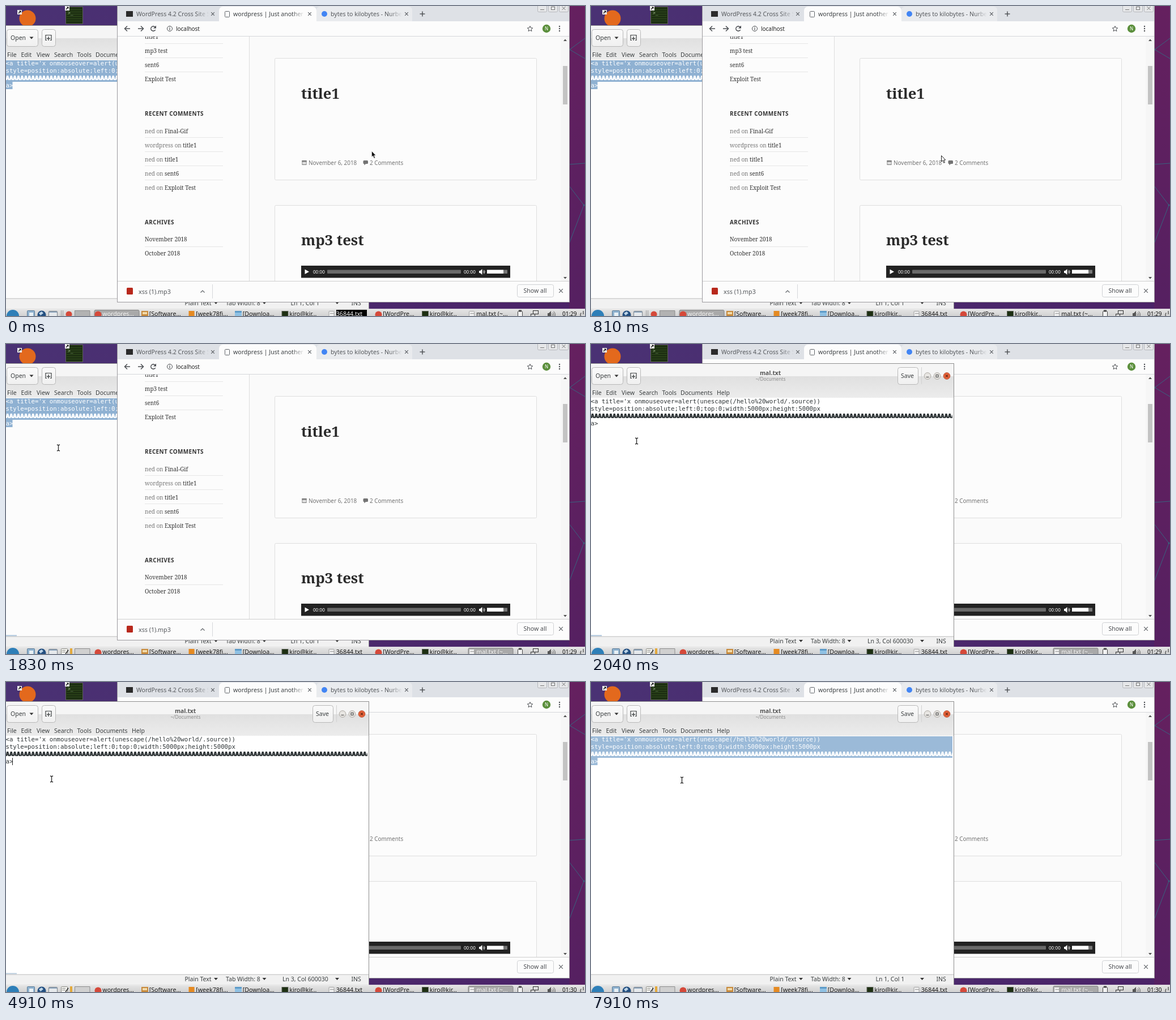
An HTML page with a canvas that plays this animation: 1022 by 548 pixels, repeating every 8 s.

```html
<!DOCTYPE html>
<html lang="en">
<head>
<meta charset="utf-8">
<title>Editor and browser</title>
<style>
html, body { margin: 0; width: 100%; height: 100%; overflow: hidden; }
canvas { display: block; }
</style>
</head>
<body>
<canvas id="stage" width="1022" height="548"></canvas>
<script>
const c = document.getElementById('stage').getContext('2d');
const LOOP = 8000, RAISE = 2040, SELECT = 6860;
const SANS = '"Noto Sans", sans-serif', SERIF = '"Noto Serif", serif';
const MONO = '"DejaVu Sans Mono", monospace', ARIAL = '"Liberation Sans", sans-serif';

// start time, x, y, shape
const POINTER = [
  [0, 645, 256, 'dark'], [150, 643, 256, 'light'], [370, 646, 255, 'light'],
  [660, 646, 263, 'light'], [810, 618, 264, 'light'], [950, 120, 184, 'beam'],
  [1100, 120, 185, 'beam'], [1240, 100, 189, 'beam'], [1390, 100, 188, 'beam'],
  [1830, 92, 183, 'beam'], [RAISE, 80, 171, 'beam'], [7910, 160, 173, 'beam']
];
// moments at which the caret turns on and off
const CARET = [[2490, 3260], [3710, 4460], [4910, SELECT]];

function rect(x, y, w, h, fill) {
  c.fillStyle = fill;
  c.fillRect(x, y, w, h);
}
function round(x, y, w, h, r, fill, line) {
  c.beginPath();
  c.roundRect(x, y, w, h, r);
  if (fill) { c.fillStyle = fill; c.fill(); }
  if (line) { c.strokeStyle = line; c.lineWidth = 1; c.stroke(); }
}
function disc(x, y, r, fill, line) {
  c.beginPath();
  c.arc(x, y, r, 0, 7);
  if (fill) { c.fillStyle = fill; c.fill(); }
  if (line) { c.strokeStyle = line; c.stroke(); }
}
function line(color, width, ...p) {
  c.beginPath();
  for (let i = 0; i < p.length; i += 2) c.lineTo(p[i], p[i + 1]);
  c.strokeStyle = color;
  c.lineWidth = width;
  c.stroke();
}
function poly(fill, ...p) {
  c.beginPath();
  for (let i = 0; i < p.length; i += 2) c.lineTo(p[i], p[i + 1]);
  c.closePath();
  c.fillStyle = fill;
  c.fill();
}
function text(s, x, y, size, color, family = SANS, weight = 400) {
  c.font = `${weight} ${size}px ${family}`;
  c.fillStyle = color;
  c.fillText(s, x, y);
  return c.measureText(s).width;
}
function shade(x0, y0, x1, y1, from, to) {
  const g = c.createLinearGradient(x0, y0, x1, y1);
  g.addColorStop(0, from);
  g.addColorStop(1, to);
  return g;
}
function cross(x, y, r, color, width = 1.2) {
  line(color, width, x - r, y - r, x + r, y + r);
  line(color, width, x + r, y - r, x - r, y + r);
}
function down(x, y, color = '#333') {
  poly(color, x - 3.5, y - 2, x + 3.5, y - 2, x, y + 2);
}
function terminal(x, y, size) {
  rect(x, y, size, size, '#5d6359');
  rect(x + 1, y + 1, size - 2, size - 2, '#1d2f12');
}

function desktop() {
  rect(0, 0, 1022, 548, shade(0, 0, 1022, 0, '#4a3274', '#4b2267'));
  rect(994, 0, 28, 548, shade(0, 0, 0, 548, '#65205f', '#552061'));
  const teal = '#37647f';
  line(teal, 1, 1022, 57, 995, 77, 1022, 93);
  line(teal, 1, 994, 280, 1022, 278);
  line(teal, 1, 994, 318, 1020, 352, 994, 420);
  disc(1020, 352, 1.5, teal);
  disc(995, 77, 1.5, teal);
  disc(38, 22, 14.5, '#e3691d');
  terminal(105, 1, 31);
  for (let y = 6; y < 30; y += 4) line('#2f4a1c', 1, 107, y + .5, 134, y + .5);
  text('>_', 109, 15, 8, '#9fb88e', MONO);
  for (const [x, y] of [[20, 7], [104, 0]]) {
    rect(x, y, 8, 8, '#eee');
    line('#111', 1.3, x + 2, y + 6, x + 6, y + 2);
    poly('#111', x + 3, y + 1.5, x + 6.5, y + 1.5, x + 6.5, y + 5);
  }
}

function tab(title, x, end, color) {
  c.save();
  c.beginPath();
  c.rect(x, 0, end - x, 26);
  c.clip();
  text(title, x, 18, 10.55, shade(end - 22, 0, end, 0, color, color + '00'));
  c.restore();
}

function browserFrame() {
  rect(196, 0, 799, 524, '#9c9a9e');
  rect(197, 0, 797, 523, '#fcfcfc');
  rect(197, 0, 797, 27, '#dee1e6');
  round(548, 1, 169, 26, [6, 6, 0, 0], '#e9ebee');
  round(376, 1, 172, 30, [7, 7, 0, 0], '#fcfcfc');
  rect(212, 9, 12, 10, '#2b2b2b');
  tab('WordPress 4.2 Cross Site Scripting', 230, 358, '#55585c');
  tab('wordpress | Just another WordPress site', 401, 527, '#3c4043');
  tab('bytes to kilobytes - Nurbex Search', 573, 699, '#55585c');
  c.lineWidth = 1;
  round(386.5, 9.5, 8, 10, 1, '#fff', '#5f6368');
  disc(562, 14, 5, '#4285f4');
  for (const x of [365, 536, 707]) cross(x, 14, 2.8, '#5f6368');
  line('#4a4d51', 1.4, 730.5, 14, 739.5, 14);
  line('#4a4d51', 1.4, 735, 9.5, 735, 18.5);

  for (const x of [938.5, 957.5, 976.5]) round(x, -4.5, 16, 15, 2, '#e6e7e9', '#b4b6ba');
  line('#777', 1, 943, 6.5, 950, 6.5);
  c.strokeRect(962.5, 1.5, 6, 5);
  cross(984.5, 4, 3, '#777', 1);

  const ink = '#4a4d51';
  line(ink, 1.5, 214, 35.5, 209.5, 40, 214, 44.5);
  line(ink, 1.5, 210, 40, 219, 40);
  line(ink, 1.5, 238, 35.5, 242.5, 40, 238, 44.5);
  line(ink, 1.5, 233, 40, 242, 40);
  c.beginPath();
  c.arc(260, 40, 4.2, .5, 5.5);
  c.stroke();
  poly(ink, 265, 34.5, 265, 39.5, 260, 39.5);
  c.lineWidth = 1;
  disc(289, 40, 4.5, null, ink);
  line(ink, 1.2, 289, 39, 289, 42.7);
  rect(288.4, 37, 1.2, 1.2, ink);
  text('localhost', 300, 44, 9.93, '#222');
  const star = [];
  for (let i = 0; i < 11; i++) {
    const a = i * Math.PI / 5 - Math.PI / 2, r = i % 2 ? 2.3 : 5;
    star.push(925 + r * Math.cos(a), 40.5 + r * Math.sin(a));
  }
  line(ink, 1, ...star);
  disc(954, 40, 7.2, '#5b8f3c');
  text('N', 950.9, 43, 8, '#fff');
  for (const y of [36, 40, 44]) disc(977, y, 1.2, ink);
  rect(197, 53, 797, 1, '#d5d7da');
}

function sidebar() {
  const rule = y => rect(245, y, 138, 1, '#e6e6e6');
  const link = (s, x, y) => text(s, x, y, 9.93, '#333', SERIF);
  const heading = (s, y) => {
    c.letterSpacing = '0.4px';
    text(s, 245, y, 9.93, '#333', SANS, 700);
    c.letterSpacing = '0px';
  };
  ['title1', 'mp3 test', 'sent6', 'Exploit Test'].forEach((s, i) => {
    link(s, 245, 58 + i * 25);
    if (i < 3) rule(66 + i * 25);
  });
  heading('RECENT COMMENTS', 194);
  [['ned', 'Final-Gif'], ['wordpress', 'title1'], ['ned', 'title1'],
   ['ned', 'sent6'], ['ned', 'Exploit Test']].forEach(([who, post], i) => {
    const w = text(who + ' on ', 245, 224.5 + i * 25.1, 9.93, '#777', SERIF);
    link(post, 245 + w, 224.5 + i * 25.1);
    if (i < 4) rule(232 + i * 25);
  });
  heading('ARCHIVES', 386);
  link('November 2018', 245, 416);
  rule(425);
  link('October 2018', 245, 441);
}

function posts() {
  rect(429, 54, 1, 433, '#dedede');
  rect(430, 54, 549, 433, '#fafafa');
  round(474.5, 92.5, 462, 215, 2, '#fcfcfc', '#dedede');
  round(474.5, 352.5, 462, 150, 2, '#fcfcfc', '#dedede');
  text('title1', 521, 164, 25.65, '#2a2a2a', SERIF, 700);
  text('mp3 test', 521, 423, 25.65, '#2a2a2a', SERIF, 700);
  c.strokeStyle = '#777';
  c.strokeRect(523, 273.5, 7, 7);
  rect(522.5, 273, 8, 2.5, '#777');
  for (const x of [525.3, 527.7]) line('#999', .7, x, 275, x, 280);
  text('November 6, 2018', 534, 280.5, 9.93, '#737373');
  round(630.5, 273, 8.5, 6, 1.5, '#737373');
  poly('#737373', 632, 278, 636, 278, 632.5, 281.5);
  text('2 Comments', 642, 280.5, 9.93, '#737373');

  rect(521, 459, 369, 21.5, '#222');
  poly('#fff', 527.5, 465.5, 535, 469.8, 527.5, 474);
  text('00:00', 542, 473, 8.3, '#fff', ARIAL);
  round(567, 466.5, 236, 6.5, 1, '#6a6a6a');
  text('00:00', 808, 473, 8.3, '#fff', ARIAL);
  poly('#fff', 835, 468, 837, 468, 840.5, 465, 840.5, 475, 837, 472, 835, 472);
  for (const r of [2, 4]) {
    c.beginPath();
    c.arc(841, 470, r, -1, 1);
    c.strokeStyle = '#fff';
    c.lineWidth = 1;
    c.stroke();
  }
  rect(849, 466.5, 36, 6.5, '#777');
  rect(849, 466.5, 29, 6.5, '#fff');
}

function browser() {
  c.save();
  c.beginPath();
  c.rect(197, 54, 797, 433);
  c.clip();
  rect(197, 54, 797, 433, '#fcfcfc');
  sidebar();
  posts();
  rect(979, 54, 15, 433, '#f6f6f6');
  rect(983, 106, 8, 68, '#c3c3c3');
  poly('#505050', 984, 62, 990, 62, 987, 58.5);
  poly('#505050', 984, 479, 990, 479, 987, 482.5);
  c.restore();

  rect(197, 486, 797, 1, '#cfcfcf');
  round(213, 498, 11, 12, 1.5, '#b8281c');
  text('xss (1).mp3', 234, 508.5, 10.7, '#55585c');
  line('#5f6368', 1.2, 343.5, 506.5, 347, 503, 350.5, 506.5);
  rect(364, 492, 1, 25, '#d5d7da');
  round(902.5, 492.5, 64, 22, 3, '#fcfcfc', '#cfd1d4');
  text('Show all', 913.5, 507, 10.55, '#4a4d51');
  cross(979.5, 503.5, 3.3, '#5f6368');
}

function button(x, w) {
  round(x + .5, 41.5, w, 30, 4, shade(0, 41, 0, 71, '#fafafa', '#f0f0f0'), '#b9b9b9');
}

function editor(t) {
  const raised = t >= RAISE, selected = !raised || t >= SELECT;
  const ink = '#3b3f40', ui = (s, x, y) => text(s, x, y, 10.5, ink);
  rect(0, 34, 641, 502, '#8f8f8f');
  rect(0, 35, 640, 22, '#f5f5f5');
  rect(0, 57, 640, 38, shade(0, 57, 0, 95, '#e0e0e0', '#ececec'));
  rect(0, 95, 640, 422, raised ? '#fff' : '#fcfcfc');
  button(1, 55);
  button(63, 24);
  button(541, 36);
  ui('Open', 8, 60);
  down(45, 56.5);
  line(ink, 1.2, 72, 60.5, 70, 60.5, 70, 51.5, 80, 51.5, 80, 60.5, 78, 60.5);
  line(ink, 1.3, 75, 54, 75, 61);
  line(ink, 1.3, 71.8, 57.5, 78.2, 57.5);
  ui('Save', 547, 60);
  text('mal.txt', 298, 55, 10.3, '#555', SANS, 700);
  text('~/Documents', 290.5, 65, 8.4, '#8c8c8c');
  rect(583, 41, 1, 30, '#d2d2d2');
  c.lineWidth = 1;
  disc(594, 56.5, 5.8, '#e7e5e2', '#aaa6a0');
  disc(611, 56.5, 5.8, '#e7e5e2', '#aaa6a0');
  disc(628, 56.5, 5.8, '#e8633a', '#b5482a');
  line('#555', 1.2, 591.5, 58.5, 596.5, 58.5);
  c.strokeRect(609, 54.5, 4, 4);
  cross(628, 56.5, 2.2, '#5a2415');
  [['File', 2], ['Edit', 26.5], ['View', 54], ['Search', 85], ['Tools', 125.5],
   ['Documents', 158], ['Help', 222]].forEach(([s, x]) => ui(s, x, 90));

  if (selected) {
    const blue = raised ? '#9bbad8' : '#8fb1d2';
    rect(0, 96, 638, 38, blue);
    rect(0, 134, 11.5, 13, blue);
  }
  const code = (s, y, x = -.5, weight = 400) =>
    text(s, x, y, 10.7, selected ? '#fff' : '#2e3436', MONO, weight);
  code("<a title='x onmouseover=alert(unescape(/hello%20world/.source))", 105);
  code('style=position:absolute;left:0;top:0;width:5000px;height:5000px', 118);
  c.save();
  c.beginPath();
  c.rect(0, 120, 638, 14);
  c.clip();
  for (const shift of [-1, 0]) code('A'.repeat(101), 131, shift, 700);
  c.restore();
  code('a>', 144);
  if (CARET.some(([on, off]) => t >= on && t < off)) rect(11, 134, 1, 13, '#222');
  if (t >= 950 && t < SELECT) rect(0, 514.5, 19, 2, t < 3560 ? '#a9c3dc' : '#b7cbdd');

  rect(0, 516.5, 640, 1, '#cdcdcd');
  rect(0, 517.5, 640, 18, '#f1f1f1');
  ui('Plain Text', 315.5, 529);
  down(370.5, 525);
  ui('Tab Width: 8', 388, 529);
  down(456, 525);
  ui(selected ? 'Ln 1, Col 1' : 'Ln 3, Col 600030', selected ? 502.5 : 488, 529);
  down(584.5, 525);
  ui('INS', 609.5, 529);
}

function taskbar(t) {
  const editing = t >= 1530, labelled = t < 370;
  rect(0, 535.5, 1022, 13, shade(0, 536, 0, 548, '#e4e4e4', '#d2d2d2'));
  rect(0, 535.5, 1022, 1, '#f4f4f4');
  disc(12, 548, 11, '#2e7fb8');
  round(37.5, 538.5, 13, 12, 1, '#8fb2cf', '#5b7b96');
  rect(41, 542, 7, 6, '#e8f0f5');
  disc(63, 546, 7.5, '#234f80');
  poly('#bcd3e6', 58, 543, 63, 540, 66, 543, 61, 547);
  round(75.5, 539.5, 15, 12, 1, '#e6e9ec', '#7c848c');
  rect(76, 540, 14, 2, '#8fa6bd');
  if (editing) {
    round(97.5, 538.5, 11, 12, 1, '#f5f5f0', '#8b8b85');
    for (const y of [541.5, 544.5]) line('#888', 1, 99, y, 105, y);
    line('#333', 1.6, 110, 541, 105, 548);
    rect(113, 538, 4, 10, '#e3a93b');
  } else {
    for (const x of [97.5, 100.5]) line('#999', 1, x, 538, x, 548);
    disc(111, 545, 5.5, '#d5493a');
  }
  rect(121, 538, 27, 10, editing ? '#d0d0d0' : '#b2b2b2');
  line('#8d8d8d', 1, 121.5, 548, 121.5, 538.5, 148, 538.5, 148, 548);

  const names = ['wordpres...', '[Software...', '[week78fi...', '[Downloa...', 'kiro@kir...',
    '36844.txt', '[WordPre...', 'kiro@kir...', 'mal.txt (~...'];
  const kinds = 'BFVDTNBTN';
  names.forEach((s, i) => {
    const x = 162.5 + i * 82.5, pressed = i === (editing ? 8 : 0);
    if (pressed) round(x - 6.5, 537.5, 79, 14, 2, '#a9a9a9', '#858585');
    const kind = kinds[i];
    if (kind === 'B') disc(x, 545.5, 6, '#d5493a');
    if (kind === 'F') { rect(x - 6, 539, 12, 10, '#c78a3c'); rect(x - 4, 541, 8, 4, '#f1d9a8'); }
    if (kind === 'V') rect(x - 5, 539, 10, 10, '#e58a22');
    if (kind === 'D') { rect(x - 6, 539, 12, 10, '#5c9bc9'); rect(x - 6, 542, 12, 6, '#8fc1e4'); }
    if (kind === 'T') terminal(x - 6, 539, 12);
    if (kind === 'N') {
      round(x - 5, 539.5, 9, 12, 1, '#ededed', '#a5a5a5');
      line('#999', 1, x - 3, 543.5, x + 4, 543.5);
    }
    const label = labelled && i === 5;
    if (label) rect(583, 537, 54, 11, '#000');
    text(s, x + 7.8, 548, 10.6, label || pressed ? '#f5f5f5' : '#1c1c1c');
  });

  round(903.5, 539.5, 8, 11, 1, '#f2f2f2', '#444');
  rect(905, 537.5, 5, 3, '#444');
  c.strokeStyle = '#333';
  c.strokeRect(930.5, 538.5, 9, 6);
  c.strokeRect(926.5, 544.5, 7, 5);
  poly('#555', 956, 543, 958, 543, 962, 539, 962, 549, 956, 549);
  for (const r of [3, 5.5, 8]) {
    c.beginPath();
    c.arc(961.5, 546, r, -.9, .9);
    c.strokeStyle = '#666';
    c.stroke();
  }
  text(t < 3860 ? '01:29' : '01:30', 982, 548, 10, '#111');
  c.lineWidth = 1.4;
  c.beginPath();
  c.arc(1019, 546, 5, -.8, 3.9);
  c.strokeStyle = '#555';
  c.stroke();
  line('#555', 1.4, 1019, 539, 1019, 545);
}

function pointer(t) {
  const [, x, y, shape] = POINTER.filter(k => k[0] <= t).pop();
  c.save();
  c.translate(x + .5, y + .5);
  if (shape === 'beam') {
    for (const [color, w] of [['#fff', 3], ['#333', 1.4]]) {
      line(color, w, -2.5, -5.5, 0, -4.5, 2.5, -5.5);
      line(color, w, -2.5, 5.5, 0, 4.5, 2.5, 5.5);
      line(color, w, 0, -4.5, 0, 4.5);
    }
  } else {
    const dark = shape === 'dark';
    const arrow = [0, 0, 0, 10.5, 2.3, 8.3, 4.2, 12.8, 6, 12, 4.2, 7.8, 7.2, 7.6];
    poly(dark ? '#111' : '#fff', ...arrow);
    line(dark ? '#fff' : '#222', dark ? .6 : 1, ...arrow, 0, 0);
  }
  c.restore();
}

function draw(now) {
  const t = now % LOOP;
  desktop();
  if (t < RAISE) editor(t);
  browserFrame();
  browser();
  if (t >= RAISE) editor(t);
  taskbar(t);
  pointer(t);
}

const start = performance.now();
function frame() {
  draw(performance.now() - start);
  requestAnimationFrame(frame);
}
frame();
</script>
</body>
</html>
```
